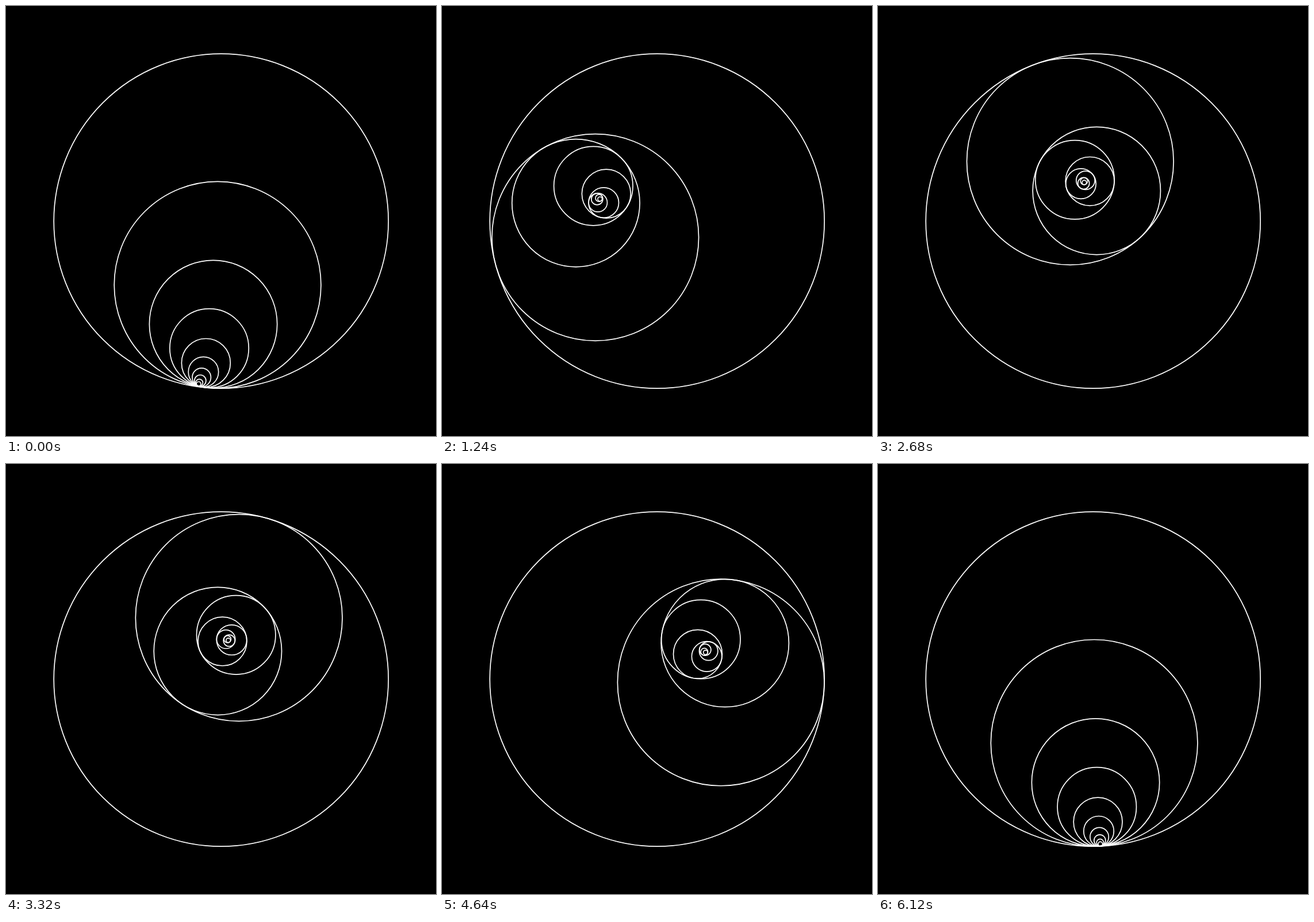
Recreate the animation shown at these times as an HTML page with a canvas. Size 748 by 748 pixels, loop 6.16 s.

```html
<!DOCTYPE html>
<html lang="en">
<head>
<meta charset="utf-8">
<title>Nested circles</title>
<style>
html, body { margin: 0; width: 100%; height: 100%; overflow: hidden; background: #000; }
canvas { display: block; width: 748px; height: 748px; }
</style>
</head>
<body>
<canvas id="stage" width="748" height="748"></canvas>
<script>
const ctx = document.getElementById('stage').getContext('2d');
const LOOP = 6160, STEP = 40;
const CENTER = 374.2, RADIUS = 291, COUNT = 10;
const RATIO = (Math.sqrt(5) - 1) / 2;
const START = 3.15, TURN = 2.3258; // degrees, degrees per step

function circle(x, y, r) {
  ctx.beginPath();
  ctx.arc(x, y, r, 0, Math.PI * 2);
  ctx.stroke();
}

// Each circle rolls inside its parent; level k turns k times as fast as level 1.
function draw(time) {
  const step = Math.floor((time % LOOP) / STEP);
  const angle = (START + TURN * step) * Math.PI / 180;
  let x = CENTER, y = CENTER, r = RADIUS;

  ctx.fillStyle = '#000';
  ctx.fillRect(0, 0, 748, 748);
  ctx.strokeStyle = '#fff';
  ctx.lineWidth = 1.7;

  for (let k = 1; k <= COUNT; k++) {
    circle(x, y, r);
    const gap = r * (1 - RATIO);
    x -= gap * Math.sin(k * angle);
    y += gap * Math.cos(k * angle);
    r *= RATIO;
  }
}

let origin;
function tick(now) {
  if (origin === undefined) origin = now;
  draw(Math.max(0, now - origin));
  requestAnimationFrame(tick);
}
draw(0);
requestAnimationFrame(tick);
</script>
</body>
</html>
```
